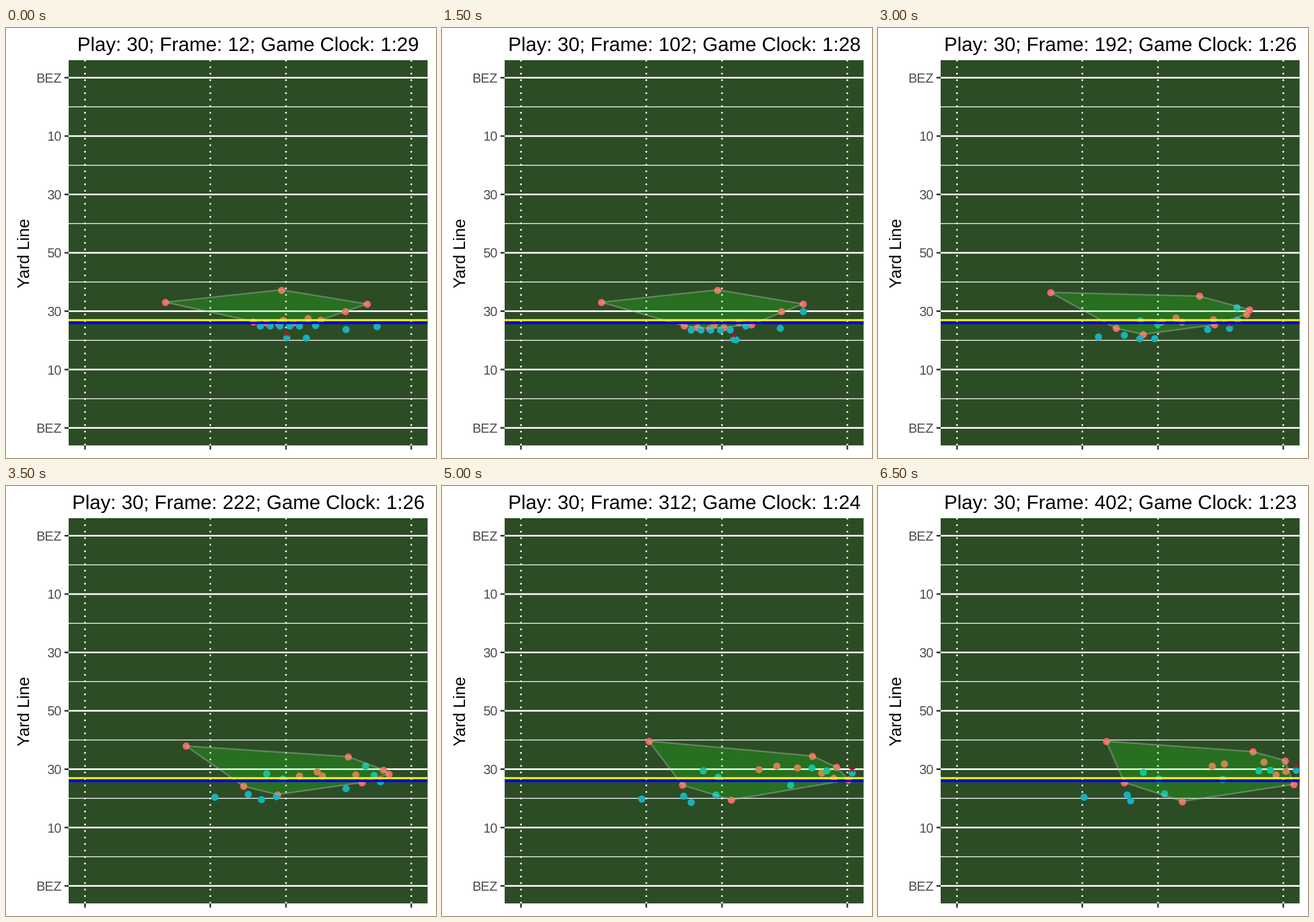
Write a matplotlib script that moves like this. It is 748 px wide and 748 px high and loops after 7000 ms.

```python
import numpy as np
import matplotlib.pyplot as plt
from matplotlib.animation import FuncAnimation
from matplotlib.patches import Polygon, Rectangle

plt.rcParams.update({"font.family": "Liberation Sans", "text.hinting": "none",
                     "path.snap": False})

SIZE, DPI = 748, 100
PT = 72 / DPI                        # points per pixel
STEPS, STEP_MS = 14, 500
LEFT, RIGHT, TOP, BOTTOM = 109, 733.4, 56, 726.1
THICK = 2.83
FIELD, RED, TEAL = "#2c4c26", "#f96661", "#18b2bb"

# Half-second steps: snap, handoff, mid-run, end of the run
SNAP, HANDOFF, MID, END = 0, 3, 8, 13

# Each defender: line-up, mid-run, end
SECONDARY = [
    [(277, 477), (326, 447), (397, 444)],
    [(479, 455.5), (621, 473), (652, 462)],
    [(628, 480), (665, 495), (708, 477.5)],
    [(590, 492.5), (684, 504), (723, 519)],
]
FRONT = [
    [(547, 508), (627, 499), (692, 501.5)],
    [(525, 504.5), (645, 515), (709, 496)],
    [(482, 508), (558, 492.5), (602, 482.5)],
    [(499, 513), (570, 499), (671, 480)],
    [(474, 515), (523, 499), (581, 487)],
    [(453, 513), (481, 540.5), (529, 548.5)],
    [(430, 510.5), (413, 522.5), (428.5, 515.5)],
]
# Linemen start evenly spaced, so only mid-run and end are given
BLOCKS = [
    [(350, 543.5), (358, 541)],
    [(416, 538), (433, 536.5)],
    [(451, 495.5), (461.5, 497.5)],
    [(436, 548.5), (439, 546.5)],
    [(478, 506), (488, 509)],
]
LINE = [[(442 + 17 * i, 517.5)] + b for i, b in enumerate(BLOCKS)]

PASSER = [(488, 538), (507, 540.5), (465, 539), (498, 535)]
RUNNER = [(522, 539), (511, 541.5), (681, 507.5), (727, 493.5)]
ENDS = [
    [(538.5, 517), (528, 517.5), (602.5, 526), (599, 509.5)],
    [(591, 524), (588.5, 521.5), (652, 499), (682, 494)],
    [(645, 518.5), (628, 493), (628, 487), (662.5, 495)],
]


def path(points, t):
    """Smooth cubic through the waypoints, at rest at both ends."""
    m = np.array((SNAP, HANDOFF, MID, END)[-len(points):], float)
    p = np.array(points, float)
    t = max(t, m[0])
    v = np.gradient(p, m, axis=0)
    v[0] = v[-1] = 0
    i = min(np.searchsorted(m, t, side="right") - 1, len(m) - 2)
    h = m[i + 1] - m[i]
    u = (t - m[i]) / h
    return ((1 + 2 * u) * (1 - u) ** 2 * p[i] + u * (1 - u) ** 2 * h * v[i]
            + u * u * (3 - 2 * u) * p[i + 1] + u * u * (u - 1) * h * v[i + 1])


def surge(t):
    """Push of the whole scrum into the backfield before the run breaks."""
    return np.array((-10, 9)) * np.sin(np.pi * min(t, MID) / MID) ** 2


def hull(points):
    pts = sorted(map(tuple, points))

    def chain(seq):
        out = []
        for x, y in seq:
            while len(out) > 1:
                (ax, ay), (bx, by) = out[-2:]
                if (bx - ax) * (y - ay) - (by - ay) * (x - ax) > 0:
                    break
                out.pop()
            out.append((x, y))
        return out[:-1]

    return chain(pts) + chain(pts[::-1])


fig = plt.figure(figsize=(SIZE / DPI, SIZE / DPI), dpi=DPI, facecolor="white")
ax = fig.add_axes([0, 0, 1, 1])
ax.set(xlim=(0, SIZE), ylim=(SIZE, 0))
ax.axis("off")
panel = Rectangle((LEFT, TOP), RIGHT - LEFT, BOTTOM - TOP, fc=FIELD, lw=0, zorder=0)
ax.add_patch(panel)


def line(xs, ys, color, width, z, **kw):
    ax.plot(xs, ys, color=color, lw=width * PT, zorder=z, solid_capstyle="butt", **kw)


def across(y, color, width, z):
    line((LEFT, RIGHT), (y, y), color, width, z)


def label(x, y, text, size, color="black", **kw):
    return ax.text(x, y, text, fontsize=size * PT, color=color, va="baseline", **kw)


def dots(color, z):
    s = ax.scatter([], [], s=(12.4 * PT) ** 2, c=color, lw=0, zorder=z)
    s.set_clip_path(panel)
    return s


# The field fills the panel up to a margin of 1/22 on each side
gap = (BOTTOM - TOP) / 6.6
for i, name in enumerate(("BEZ", "10", "30", "50", "30", "10", "BEZ")):
    y = TOP + gap * (0.3 + i)
    across(y, "white", THICK, 2)
    line((LEFT - 7.3, LEFT), (y, y), "#333333", THICK, 2)
    label(96.5, y + 8.2, name, 22.9, "#4d4d4d", ha="right")
    if i < 6:
        across(y + gap / 2, "white", THICK / 2, 1)

for part in (0, 0.384, 0.616, 1):
    x = LEFT + (RIGHT - LEFT) * (0.05 + part) / 1.1
    line((x, x), (BOTTOM, TOP), "white", THICK, 3, ls=(0, (1, 3)), dash_capstyle="butt")
    line((x, x), (BOTTOM, BOTTOM + 7.3), "#333333", THICK, 2)

across(508.1, "yellow", 3.2, 9)
across(513.2, "blue", 3.8, 9)

label(41, 392, "Yard Line", 28.8, ha="center", rotation=90, rotation_mode="anchor")
title = label(421.3, 39.5, "", 34.4, ha="center")

defense, offense = dots(RED, 4), dots(TEAL, 5)
ball, = ax.plot([], [], marker=(5, 2, 0), ms=11 * PT, mew=2.2 * PT,
                mec="#961e24", ls="", zorder=6)
zone = Polygon([(0, 0)] * 3, fc=(0.1, 1, 0.05, 0.2), ec=(0.745, 0.745, 0.745, 0.4),
               lw=2.6 * PT, joinstyle="round", zorder=7)
ax.add_patch(zone)


def draw(k):
    push = surge(k)
    reds = [path(p, k) for p in SECONDARY] + [path(p, k) + push for p in FRONT]
    teals = [path(p, k) + push for p in LINE]
    teals += [path(p, k) for p in ENDS + [PASSER, RUNNER]]
    defense.set_offsets(reds)
    offense.set_offsets(teals)
    zone.set_xy(hull(reds))
    x, y = path(PASSER if k <= HANDOFF else RUNNER, k)
    ball.set_data([x], [y - 7.5])
    title.set_text(f"Play: 30; Frame: {12 + 30 * k}; Game Clock: 1:{29 - k // 2}")
    return defense, offense, zone, ball, title


anim = FuncAnimation(fig, draw, frames=STEPS, interval=STEP_MS,
                     repeat=True, repeat_delay=0, blit=False)
plt.show()
```
